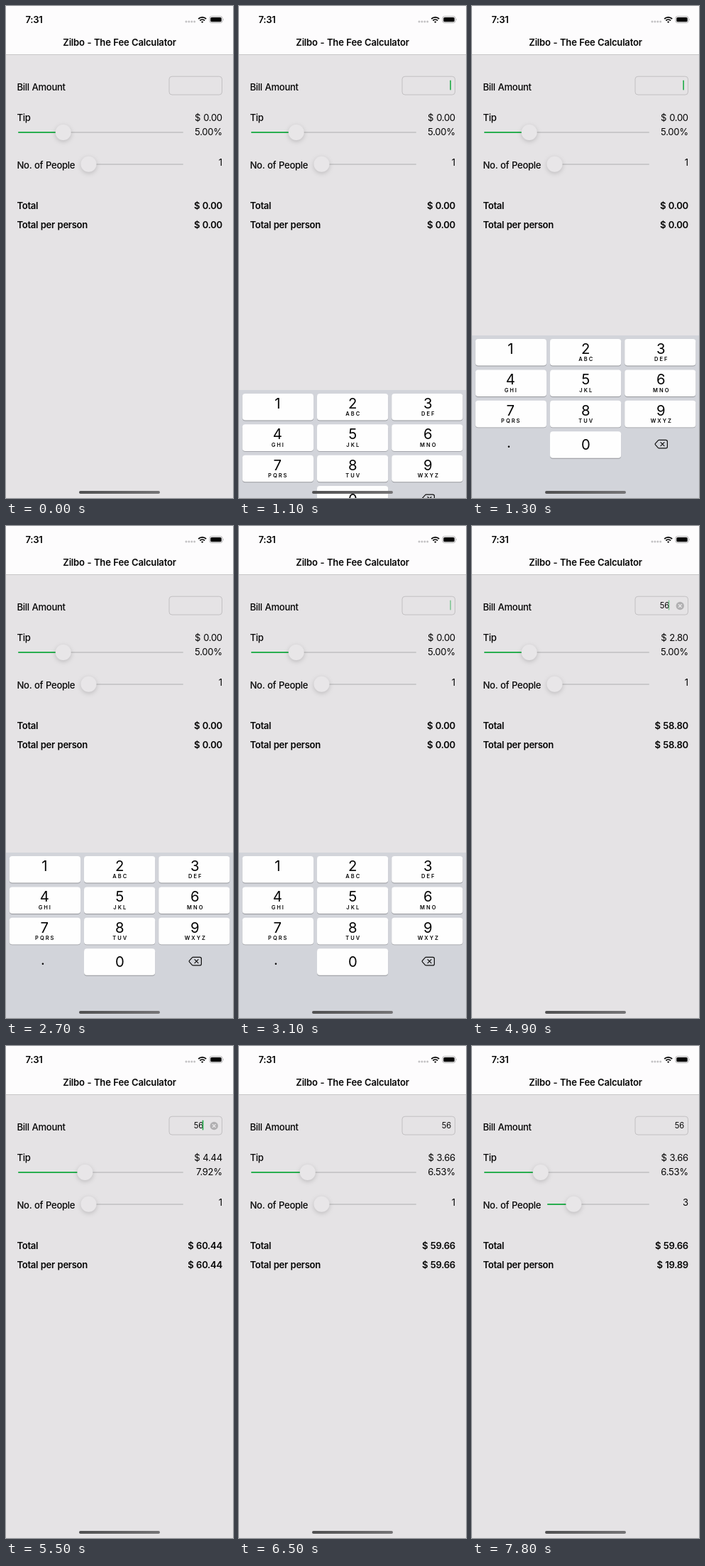
Recreate the animation shown at these times as an HTML page. Size 320x693 px, loop 8 s.

```html
<!DOCTYPE html>
<html lang="en">
<head>
<meta charset="utf-8">
<title>Fee calculator</title>
<style>
  html, body { margin: 0; width: 100%; height: 100%; overflow: hidden; background: #e5e3e5; }
  svg { display: block; width: 100%; height: 100%; }
  text { font-family: Inter, Roboto, sans-serif; font-size: 13.1px; letter-spacing: -.31px; word-spacing: .6px; fill: #050505; }
  .label { font-weight: 500; }
  .bold { font-weight: 600; }
  .title { letter-spacing: -.23px; }
  .end { text-anchor: end; }
  .mid { text-anchor: middle; }
  .amount { font-size: 11.2px; letter-spacing: -.1px; }
  .digit { font-size: 20.3px; text-anchor: middle; letter-spacing: 0; }
  .letters { font-size: 7.5px; font-weight: 600; letter-spacing: 2px; text-anchor: middle; }
  .rail { stroke: #c9c8ca; stroke-width: 2; stroke-linecap: round; }
  .fill { stroke: #2aae50; stroke-width: 2; stroke-linecap: round; }
  .thumb { fill: #e8e6e8; filter: drop-shadow(0 2.5px 3px rgba(0, 0, 0, .17)); }
</style>
</head>
<body>
<svg viewBox="0 0 320 693" preserveAspectRatio="none">
  <defs>
    <linearGradient id="bar">
      <stop offset="0" stop-color="#505051"/>
      <stop offset="1" stop-color="#757476"/>
    </linearGradient>
  </defs>
  <rect width="320" height="693" fill="#e5e3e5"/>

  <rect width="320" height="68" fill="#fdfcfd"/>
  <rect y="68" width="320" height="1" fill="#c8c6c8"/>
  <text class="bold" x="27.5" y="23.6">7:31</text>
  <g fill="#c3c2c4">
    <circle cx="254" cy="22" r="1.5"/><circle cx="257.9" cy="22" r="1.5"/>
    <circle cx="261.8" cy="22" r="1.5"/><circle cx="265.7" cy="22" r="1.5"/>
  </g>
  <g fill="none" stroke="#000" stroke-width="1.8">
    <path d="M271.2 18.2a7.8 7.8 0 0 1 11 0"/>
    <path d="M273.4 20.5a4.7 4.7 0 0 1 6.6 0"/>
    <path d="M276.7 24l-1.6-1.7a2.3 2.3 0 0 1 3.2 0z" fill="#000" stroke="none"/>
  </g>
  <rect x="287" y="14.6" width="18" height="9" rx="2.6" fill="none" stroke="#a8a7a9" stroke-width=".9"/>
  <rect x="288.3" y="15.9" width="15.4" height="6.4" rx="1.6"/>
  <path d="M306 17.5q1.5 1.6 0 3.2z" fill="#a8a7a9"/>
  <text class="bold title mid" x="160" y="55.7">Zilbo - The Fee Calculator</text>

  <text class="label" x="15.5" y="118.8">Bill Amount</text>
  <rect x="230" y="99.2" width="74.5" height="25.8" rx="4" fill="none" stroke="#c2c0c2"/>
  <text id="bill" class="amount end" y="116"></text>
  <g id="clear">
    <circle cx="293.3" cy="112.5" r="5.7" fill="#b1b0b2"/>
    <path d="M291.3 110.5l4 4m0-4l-4 4" stroke="#ebe9eb" stroke-width="1.1" stroke-linecap="round"/>
  </g>
  <rect id="caret" y="104.4" width="1.7" height="14.2" rx=".8" fill="#2aae50"/>

  <text class="label" x="15.5" y="161.5">Tip</text>
  <text id="tip" class="end" x="304.8" y="161.5"></text>
  <text id="rate" class="end" x="304.8" y="182.4"></text>
  <path class="rail" d="M18 178H249"/>
  <path id="rateFill" class="fill"/>
  <circle id="rateThumb" class="thumb" cy="178" r="11"/>

  <text class="label" x="15.5" y="228.8">No. of People</text>
  <text id="people" class="end" x="304.8" y="224.8"></text>
  <path class="rail" d="M107 223H249"/>
  <path id="peopleFill" class="fill"/>
  <circle id="peopleThumb" class="thumb" cy="222.8" r="11"/>

  <text class="bold" x="15.5" y="285.9">Total</text>
  <text id="total" class="bold end" x="304.8" y="285.9"></text>
  <text class="bold" x="15.5" y="312.9">Total per person</text>
  <text id="share" class="bold end" x="304.8" y="312.9"></text>

  <g id="keyboard">
    <rect y="460" width="320" height="240" fill="#d2d4da"/>
    <g id="keys"></g>
    <text class="digit" x="52" y="618">.</text>
    <path d="M263.6 607.3h9.6q2.2 0 2.2 2.2v7.2q0 2.2-2.2 2.2h-9.6q-.7 0-1.2-.6l-4-4.5q-.6-.7 0-1.4l4-4.5q.5-.6 1.2-.6z
             M266 610.6l5 5m0-5l-5 5" fill="none" stroke="#111" stroke-width="1.2" stroke-linecap="round" stroke-linejoin="round"/>
  </g>
  <rect x="103" y="683" width="114" height="3.9" rx="1.95" fill="url(#bar)"/>
</svg>
<script>
const LOOP = 8000, STEP = 100, KEYBOARD = 233;
const $ = id => document.getElementById(id);
const clamp = v => Math.min(1, Math.max(0, v));
const mix = (a, b, k) => a + (b - a) * k;
const money = v => '$ ' + v.toFixed(2);

function ease(t, from, to) {
  const k = clamp((t - from) / (to - from));
  return k * k * (3 - 2 * k);
}

// Critically damped spring: remaining distance, 1 to 0
function spring(t, start) {
  const x = Math.max(0, t - start) * 0.0189;
  return (1 + x) * Math.exp(-x);
}

function buildKeys() {
  const letters = ['', 'ABC', 'DEF', 'GHI', 'JKL', 'MNO', 'PQRS', 'TUV', 'WXYZ'];
  const key = (col, row, digit, sub) => {
    const x = 4.8 + col * 105.2, y = 465 + row * 43.4;
    const cx = 54.3 + col * 106;
    return `<rect x="${x}" y="${y + .9}" width="100.2" height="37.6" rx="4" fill="#95979c"/>
      <rect x="${x}" y="${y}" width="100.2" height="37.6" rx="4" fill="#fefefe"/>
      <text class="digit" x="${cx}" y="${y + (digit ? 21 : 25.6)}">${digit}</text>
      <text class="letters" x="${cx + 1}" y="${y + 31.2}">${sub}</text>`;
  };
  $('keys').innerHTML = letters
    .map((sub, i) => key(i % 3, Math.floor(i / 3), i + 1, sub))
    .join('') + key(1, 3, 0, '');
}

function keyboardOffset(t) {
  if (t < 1000 || t >= 3600) return KEYBOARD;
  return KEYBOARD * (t < 3200 ? spring(t, 982) : 1 - spring(t, 3182));
}

function caretOpacity(t) {
  if (t < 1000 || t >= 6500) return 0;
  const fade = t < 3200 ? 1600 : 3900;
  if (t < fade) return 1;
  const p = (t - fade) % 1000;
  return p < 500 ? clamp((100 - p) / 200) : clamp((p - 400) / 200);
}

function setSlider(name, left, y, x) {
  $(name + 'Thumb').setAttribute('cx', x);
  $(name + 'Fill').setAttribute('d', `M${left} ${y}H${x}`);
}

function render(t) {
  const bill = t < 3200 ? 0 : t < 3400 ? 5 : 56;
  const editing = t < 6500;
  const typed = bill > 0 && editing;

  let rate = mix(5, 7.92, ease(t, 4900, 5500));
  rate = mix(rate, 6.53, ease(t, 5700, 6300));
  const slide = ease(t, 7400, 7800);
  const people = Math.round(mix(1, 2.98, slide));
  const tip = bill * rate / 100;

  $('bill').textContent = bill || '';
  $('bill').setAttribute('x', typed ? 278 : 299);
  $('clear').style.display = typed ? '' : 'none';
  $('caret').setAttribute('x', typed ? 276.7 : 297.3);
  $('caret').style.opacity = caretOpacity(t);

  $('tip').textContent = money(tip);
  $('rate').textContent = rate.toFixed(2) + '%';
  $('people').textContent = people;
  $('total').textContent = money(bill + tip);
  $('share').textContent = money((bill + tip) / people);

  setSlider('rate', 18, 178, 28.2 + rate * 10.5);
  setSlider('people', 107, 223, mix(116.5, 143.4, slide));
  $('keyboard').setAttribute('transform', `translate(0 ${keyboardOffset(t)})`);
}

function frame() {
  const t = performance.now() % LOOP;
  render(Math.floor(t / STEP) * STEP);
  requestAnimationFrame(frame);
}

buildKeys();
frame();
</script>
</body>
</html>
```
